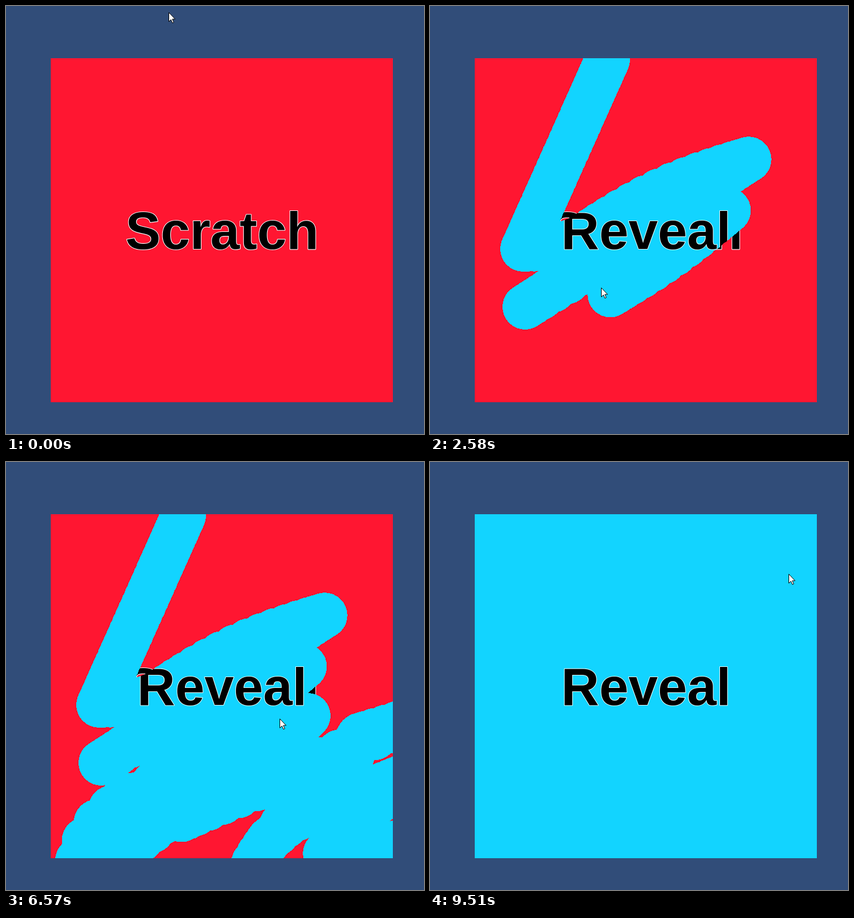
Animation of 738x754 px, one loop 9.69 s. Source, as an HTML page:

```html
<!DOCTYPE html>
<html lang="en">
<head>
<meta charset="utf-8">
<title>Scratch and reveal</title>
<style>
  html, body { margin: 0; width: 100%; height: 100%; overflow: hidden; background: #314d79; }
  svg { display: block; width: 738px; height: 754px; }
  text {
    font: bold 93px Arial, "Liberation Sans", sans-serif;
    font-kerning: none;
    text-anchor: middle;
    fill: #000;
    stroke: #fff;
    stroke-width: 2.2px;
    stroke-linejoin: round;
    paint-order: stroke;
  }
</style>
</head>
<body>
<svg viewBox="0 0 738 754">
  <defs>
    <mask id="left" maskUnits="userSpaceOnUse" x="0" y="0" width="738" height="754">
      <rect width="738" height="754" fill="#fff"/>
      <path id="trail" fill="none" stroke="#000" stroke-width="80"
            stroke-linecap="round" shape-rendering="crispEdges"/>
    </mask>
  </defs>
  <rect width="738" height="754" fill="#314d79"/>
  <rect x="79" y="92" width="604" height="606" fill="#12d4ff"/>
  <text x="381.5" y="427.5" stroke-opacity=".88">Reveal</text>
  <g id="cover" mask="url(#left)">
    <rect x="79" y="92" width="604" height="606" fill="#ff1631"/>
    <text x="381.5" y="427.5">Scratch</text>
  </g>
  <path id="cursor" d="M.5 .5V16.5L4.2 13L6.8 18.8L9.2 17.8L6.7 12.1H11.5Z"
        fill="#fff" stroke="#000" stroke-width="1"/>
</svg>
<script>
const LOOP = 9690, STEP = 30, STAMP = 16, CLEARED = 8040;

// Turning points of the hand. bow bends the way there to the right of its heading.
const turn = (t, x, y, bow = 0) => ({ t, x, y, bow });
const turns = [
  turn(0, 298, 27),
  turn(450, 313, 95),
  turn(1110, 164, 428),
  turn(1260, 265, 409, 6),
  turn(1560, 563, 270, -16),
  turn(2050, 168, 530),
  turn(2310, 527, 360, -14),
  turn(2565, 314, 511, -7),
  turn(2880, 229, 601),
  turn(3250, 533, 447),
  turn(3430, 309, 630, -14),
  turn(3660, 611, 517, -5),
  turn(3950, 488, 638),
  turn(4250, 700, 555),
  turn(4600, 564, 690),
  turn(4860, 730, 665),
  turn(5010, 730, 665),
  turn(5310, 414, 766, -40),
  turn(5460, 465, 665, -6),
  turn(5640, 624, 482, 12),
  turn(5760, 727, 450),
  turn(6080, 215, 588, -30),
  turn(6200, 120, 755, 28),
  turn(6700, 569, 410),
  turn(7200, 259, 668, -12),
  turn(7830, 506, 353),
  turn(8700, 660, 480),
  turn(9510, 644, 213)
];

const ease = u => u * u * (3 - 2 * u);

function handAt(t) {
  const i = turns.findIndex(p => p.t > t);
  if (i < 0) return turns[turns.length - 1];
  const a = turns[i - 1], b = turns[i];
  const u = ease((t - a.t) / (b.t - a.t));
  const dx = b.x - a.x, dy = b.y - a.y;
  const side = b.bow * Math.sin(Math.PI * u) / (Math.hypot(dx, dy) || 1);
  return { x: a.x + dx * u - dy * side, y: a.y + dy * u + dx * side };
}

// The brush leaves a round stamp at a steady rate.
const stamps = [];
for (let t = 0; t < CLEARED; t += STAMP) {
  const p = handAt(t);
  stamps.push(`M${p.x.toFixed(1)} ${p.y.toFixed(1)}h.01`);
}

const [trail, cover, cursor] = ["trail", "cover", "cursor"].map(id => document.getElementById(id));

function draw(time) {
  const t = Math.floor(time / STEP) * STEP;
  const hand = handAt(t);
  cursor.setAttribute("transform", `translate(${Math.round(hand.x - 11)} ${Math.round(hand.y - 16)})`);

  // The brush runs one step behind the pointer.
  const count = 1 + Math.floor(Math.max(0, t - STEP) / STAMP);
  trail.setAttribute("d", stamps.slice(0, count).join(""));
  cover.style.display = t < CLEARED ? "" : "none";
}

const began = performance.now();
function tick() {
  draw((performance.now() - began) % LOOP);
  requestAnimationFrame(tick);
}
tick();
</script>
</body>
</html>
```
